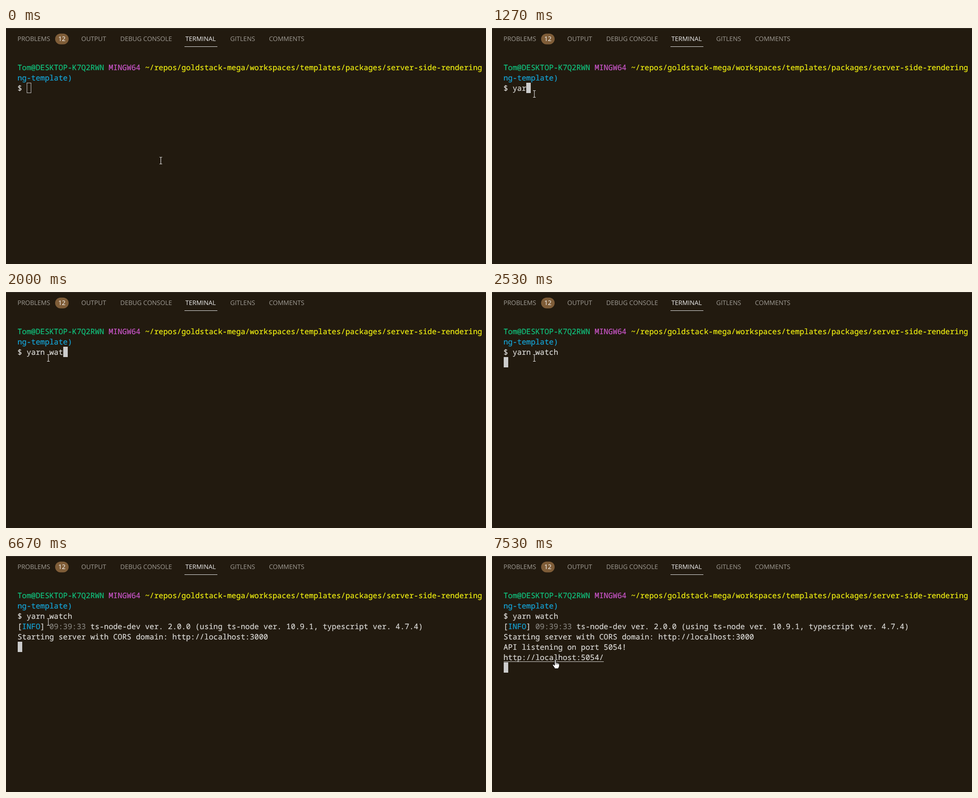
Write an HTML page that moves like this. It is 1065x526 px and loops after 8 s.

```html
<!DOCTYPE html>
<html lang="en">
<head>
<meta charset="utf-8">
<title>Terminal</title>
<style>
  html, body { margin: 0; width: 100%; height: 100%; overflow: hidden; background: #221a0f; }
  svg { display: block; width: 1065px; height: 526px; }
  text { white-space: pre; text-rendering: geometricPrecision; }
  .tab { font: 14px "Open Sans", "Noto Sans", sans-serif; fill: #a09c95; }
  .tab.on { fill: #f0f0f0; }
  .row { font: 16.85px "Noto Sans Mono", "DejaVu Sans Mono", monospace; font-weight: 500; font-variant-ligatures: none; }
  .row, .row tspan { fill: var(--ink); stroke: var(--ink); stroke-width: .2px; }
  .row { --ink: #dcdbd8; }
  .row .green { --ink: #10c47f; }
  .row .pink { --ink: #d058d0; }
  .row .yellow { --ink: #f2f210; }
  .row .cyan { --ink: #14a6da; }
  .row .grey { --ink: #85827d; }
</style>
</head>
<body>
<svg id="stage" viewBox="0 0 1065 526">
  <rect width="1065" height="526" fill="#221a0f"/>
  <rect width="1065" height="1" fill="#433e37"/>
  <g id="tabs"></g>
  <rect x="109" y="12.5" width="30" height="24" rx="12" fill="#7f5d38"/>
  <text x="124" y="29.3" class="tab" text-anchor="middle" style="fill:#fff">12</text>
  <rect x="396" y="41" width="73" height="1" fill="#e7e7e7"/>
  <g id="rows"></g>
  <rect id="underline" x="26" y="235" width="222" height="1" fill="#dcdbd8"/>
  <rect id="hollow" x="46.5" y="122.5" width="9" height="22" fill="none" stroke="#ccc"/>
  <rect id="block" width="10" height="23" fill="#ccc"/>
  <g id="beam" fill="none">
    <path d="M-3-7.5H-1Q0-7.5 0-6.5Q0-7.5 1-7.5H3M0-6.5V6.5M-3 7.5H-1Q0 7.5 0 6.5Q0 7.5 1 7.5H3" stroke="#221a0f" stroke-width="2.6"/>
    <path d="M-3-7.5H-1Q0-7.5 0-6.5Q0-7.5 1-7.5H3M0-6.5V6.5M-3 7.5H-1Q0 7.5 0 6.5Q0 7.5 1 7.5H3" stroke="#f0f0f0" stroke-width="1.1"/>
  </g>
  <g id="hand">
    <path d="M-1.5 1Q0-.8 1.5 1V7Q3 5.8 4.2 7.4Q5.6 6.6 6.6 8.2Q8.6 7.6 8.8 10V14Q8.6 17 6.8 18.5V20H-1.8V18.2L-5.8 12.6Q-6.4 10.6-4.4 10.4L-1.5 12.6Z" fill="#fff" stroke="#000"/>
    <path d="M1.5 7V11M4.2 7.5V11M6.7 8.4V11" stroke="#000" stroke-width=".8"/>
  </g>
</svg>
<script>
const LOOP = 8000, LEFT = 25.5, TOP = 76, CELL = 10.11, LINE = 23;
const $ = id => document.getElementById(id);
const span = (cls, s) => `<tspan class="${cls}">${s}</tspan>`;

const tabs = [["PROBLEMS", 25.5], ["OUTPUT", 167], ["DEBUG CONSOLE", 253.5],
  ["TERMINAL", 398], ["GITLENS", 497.5], ["COMMENTS", 583.5]];
$("tabs").innerHTML = tabs.map(([s, x]) =>
  `<text x="${x}" y="29" class="tab${s === "TERMINAL" ? " on" : ""}">${s}</text>`).join("");

const command = "yarn watch";
// each row: time it appears, content
const rows = [
  [0, span("green", "Tom@DESKTOP-K7Q2RWN") + " " + span("pink", "MINGW64") + " " +
    span("yellow", "~/repos/goldstack-mega/workspaces/templates/packages/server-side-rendering")],
  [0, span("cyan", "ng-template)")],
  [0, "$ "],
  [4330, "[" + span("cyan", "INFO") + "] " + span("grey", "09:39:33") +
    " ts-node-dev ver. 2.0.0 (using ts-node ver. 10.9.1, typescript ver. 4.7.4)"],
  [6670, "Starting server with CORS domain: http://localhost:3000"],
  [6870, "API listening on port 5054!"],
  [6870, "http://localhost:5054/"]
];
$("rows").innerHTML = rows.map(([, s], i) =>
  `<text x="${LEFT}" y="${TOP + i * LINE + 18}" class="row">${s}</text>`).join("");
const rowEls = [...$("rows").children];

const keys = [1130, 1200, 1270, 1470, 1600, 1670, 1800, 2000, 2200, 2270];
const FOCUS = 470, ENTER = 2530;

// pointer jumps: time, x, y
const pointer = [
  [0, 343.5, 295.5], [70, 303, 271], [130, 178, 197], [200, 93, 147], [600, 94, 147],
  [7200, 96, 151], [7265, 106, 170], [7330, 120, 195],
  [7400, 133, 218], [7465, 139, 228], [7530, 140.5, 231]
];

const show = (el, on) => el.setAttribute("visibility", on ? "visible" : "hidden");
const move = (el, x, y) => el.setAttribute("transform", `translate(${x} ${y})`);

function draw(t) {
  rows.forEach(([at], i) => show(rowEls[i], t >= at));
  const typed = keys.filter(k => k <= t).length;
  rowEls[2].textContent = "$ " + command.slice(0, typed);

  const entered = t >= ENTER;
  const row = entered ? rows.filter(([at]) => at <= t).length : 2;
  const col = entered ? 0 : 2 + typed;
  show($("hollow"), t < FOCUS);
  show($("block"), t >= FOCUS);
  move($("block"), Math.round(LEFT + col * CELL), TOP + row * LINE);

  const [, x, y] = pointer.filter(([at]) => at <= t).pop();
  const hover = t > 7200 && y >= 214;
  show($("underline"), hover);
  show($("beam"), !hover);
  show($("hand"), hover);
  move($("beam"), x, y);
  move($("hand"), x, y);
}

const start = performance.now();
function tick() {
  draw((performance.now() - start) % LOOP);
  requestAnimationFrame(tick);
}
draw(0);
requestAnimationFrame(tick);
</script>
</body>
</html>
```
